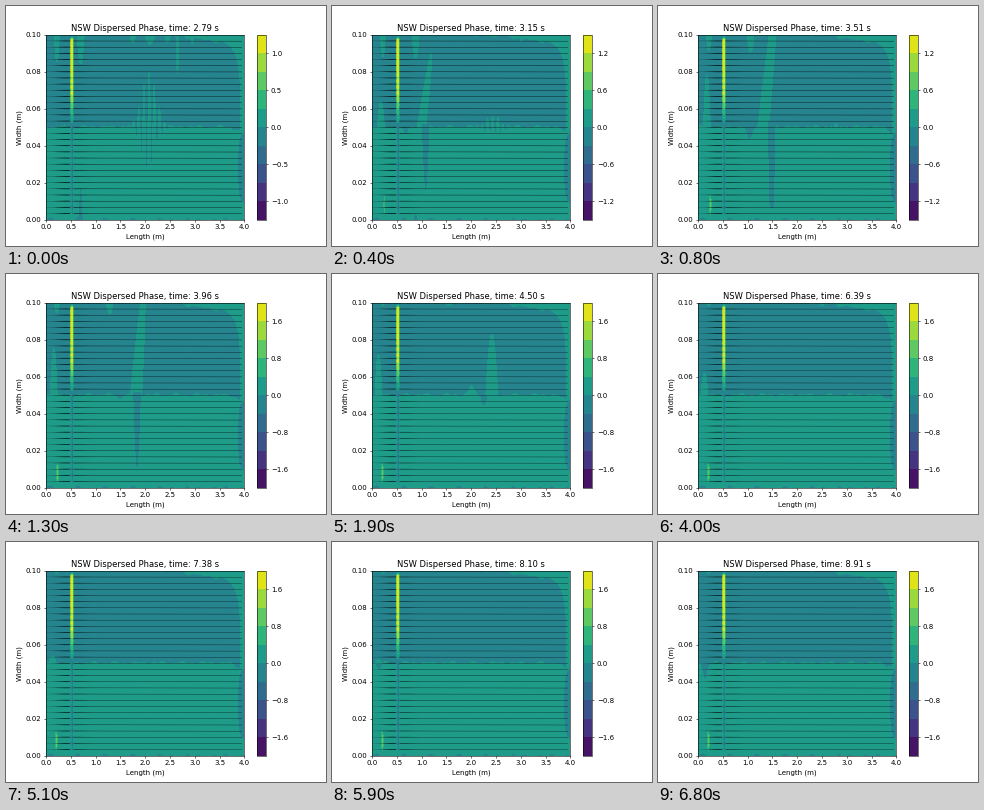
Recreate the animation shown at these times as a matplotlib script. Size 320x240 px, loop 6900 ms.

```python
import numpy as np
import matplotlib.pyplot as plt
from matplotlib.animation import FuncAnimation
from matplotlib.collections import PolyCollection

FRAMES, INTERVAL = 69, 100
T0, DT = 2.79, 0.09
LENGTH, WIDTH, MID = 4.0, 0.1, 0.05
ROWS = 30
PX = WIDTH / 184.8
JET = 0.522

X, Y = np.meshgrid(np.linspace(0, LENGTH, 501), np.linspace(0, WIDTH, 187))

fig = plt.figure(figsize=(6.4, 4.8), dpi=50)


def key(t, times, values):
    return np.interp(t, times, values)


def limit(v):
    return np.clip(v, -0.5, 0.5)


def tongue(cx, half, base, tip, lean=0.0):
    """Tapered vertical shape, positive inside, from base to tip."""
    if abs(tip - base) < 1e-4:
        return np.full_like(X, -0.5)
    s = (Y - base) / (tip - base)
    w = half * np.sqrt(np.clip(1 - s, 0, 1))
    inside = limit((w - np.abs(X - cx - lean * s)) / 0.04)
    return np.where((s < -0.05) | (s > 1), -0.5, inside)


def interface(t, front, ripple):
    """Height of the zero contour along the channel."""
    h = MID + 0.0009 * np.sin(9 * X - 4 * t) * np.sin(23 * X + t)
    c = 2.08 + 0.98 * (t - T0)
    packet = np.exp(-((X - c) / 0.21) ** 2)
    h = h + 0.03 * ripple * packet * np.cos(2 * np.pi * (X - c) / 0.105)
    trail = key(t, [2.79, 3.51, 4.5, 5.4], [0, -0.008, 0.005, 0])
    h = h + trail * np.exp(-((X - front + 0.45) / 0.07) ** 2)
    skirt = key(t, [4.5, 5.4, 6.1], [0, 0.005, 0])
    h = h + skirt * np.exp(-((X - front - 0.12) / 0.12) ** 2)
    sink = key(t, [7.4, 8.91], [0, 0.009])
    h = h - sink * np.exp(-((X - 0.14) / 0.06) ** 2)
    return h - 0.004 * np.clip((X - 3.7) / 0.3, 0, 1)


def add_wave(u, t, front):
    times = [2.79, 3.51, 4.5, 5.4, 6.1]
    crest = key(t, times, [MID, 0.13, 0.083, 0.061, MID])
    half = key(t, times, [0.06, 0.11, 0.12, 0.1, 0.05])
    lean = key(t, times, [0.1, 0.3, 0.0, 0.0, 0.0])
    lag = key(t, times, [0.1, 0.17, 0.04, 0.0, 0.0])
    u = np.maximum(u, tongue(front - lag, half, MID, crest, lean))
    trough = key(t, times, [MID, -0.02, 0.044, 0.041, MID])
    shift = key(t, times, [-0.1, 0.0, -0.2, -0.12, -0.1])
    wake = tongue(front + shift, 0.085, MID, trough)
    return np.minimum(u, -np.where(Y < 0.006, -0.5, wake))


def add_edges(u, t, ripple):
    """Short-lived spikes along the upper and lower walls."""
    for cx, half, tip in [(2.65, 0.03, 0.079), (1.75, 0.06, 0.096),
                          (2.1, 0.1, 0.095), (2.45, 0.06, 0.096),
                          (2.95, 0.04, 0.095)]:
        depth = WIDTH - (WIDTH - tip) * ripple
        u = np.maximum(u, tongue(cx + t - T0, half, WIDTH, depth))
    fade = key(t, [2.79, 3.51, 4.5], [1, 0.6, 0.1])
    u = np.maximum(u, tongue(0.22, 0.05, WIDTH, WIDTH - 0.015 * fade))
    drift = 0.7 + 0.5 * (t - T0)
    u = np.maximum(u, tongue(drift, 0.07, WIDTH, WIDTH - 0.016 * fade))
    return np.minimum(u, -tongue(drift, 0.05, 0, 0.018 * ripple))


def add_walls(u):
    reach = 0.0505 - 0.003 * np.clip((X - 2.6) / 0.6, 0, 1)
    reach = reach - 0.0012 * np.clip(np.sin(6 * X) * np.sin(17 * X), 0, 1)
    corner = (np.clip((X - 2.9) / 1.02, 0, None) ** 5
              + np.clip((Y - MID) / reach, 0, None) ** 5 - 1)
    u = np.maximum(u, limit(np.where(Y > 0.047, corner * 3, -1)))
    strip = X - 3.87 - 0.12 * ((Y - 0.028) / 0.02) ** 6
    u = np.minimum(u, -limit(strip / 0.04))
    floor = 0.0015 * np.sin(6 * X + 1) * np.sin(17 * X) - Y
    return np.minimum(u, -limit(floor / 0.001))


def add_inlet(u, t):
    """Left recirculation and the sharp jet column."""
    tip = key(t, [2.79, 3.51, 4.5, 5.4, 6.39, 7.38, 8.91],
              [0.05, 0.078, 0.072, 0.07, 0.062, 0.054, 0.05])
    cx = key(t, [3.51, 4.5], [0.18, 0.13])
    u = np.maximum(u, tongue(cx, 0.07, MID, tip))

    beat = 0.5 + 0.5 * np.cos(2 * np.pi * Y * ROWS / WIDTH)
    rise = np.clip((Y - 0.05) / 0.018, 0, 1) * np.clip((0.099 - Y) / 0.002, 0, 1)
    rise = rise * (1 - 0.25 * beat * (Y < 0.08))
    u = u + 5.2 * rise * np.exp(-((X - JET) / 0.024) ** 4)
    drop = np.clip((0.053 - Y) / 0.004, 0, 1) * np.clip(Y / 0.006, 0, 1)
    u = u - (1.2 + 1.4 * beat) * drop * np.exp(-((X - JET - 0.008) / 0.026) ** 4)

    glow = key(t, [2.79, 3.51], [0, 1.8])
    cx = key(t, [3.51, 4.5], [0.25, 0.21])
    spot = np.exp(-((X - cx) / 0.011) ** 2 - ((Y - 0.008) / 0.005) ** 4)
    return u + glow * spot


def field(t):
    front = 0.78 + 0.98 * (t - T0)
    ripple = np.exp(-(t - T0) / 0.22)
    u = limit((interface(t, front, ripple) - Y) / 0.004)
    u = add_wave(u, t, front)
    u = add_edges(u, t, ripple)
    u = add_walls(u)
    u = add_inlet(u, t)
    return np.clip(u, -4.95, 4.95)


def flow_lines(t):
    """Thin dark streaks, one per row, broken at the jet."""
    x = np.linspace(0, 3.95, 317)
    thick = (key(t, [2.79, 3.51, 4.5], [0.36, 0.36, 0.3])
             + 0.3 * np.exp(-((x - 0.4) / 0.13) ** 2)
             + 0.15 * np.exp(-((x - 0.65) / 0.2) ** 2))
    thick *= np.clip(x / 0.25, 0.4, 1)
    thick *= 1 - np.exp(-((x - JET) / 0.035) ** 4)
    half = thick * PX / 2
    lines = []
    for k in range(1, ROWS):
        y = k * WIDTH / ROWS - 0.05 * PX * x
        lines.append(np.column_stack([np.r_[x, x[::-1]],
                                      np.r_[y + half, (y - half)[::-1]]]))
    return PolyCollection(lines, facecolor="black", linewidth=0)


def draw(i):
    fig.clear()
    ax = fig.add_subplot()
    t = T0 + DT * i
    step = 0.25 if i < 4 else 0.3 if i < 12 else 0.4
    cs = ax.contourf(X, Y, field(t) * step, levels=step * np.arange(-5, 6))
    ax.add_collection(flow_lines(t))
    ax.set(xlim=(0, LENGTH), ylim=(0, WIDTH), xlabel="Length (m)",
           ylabel="Width (m)",
           title=f"NSW Dispersed Phase, time: {t:.2f} s")
    fig.colorbar(cs, ax=ax)
    return []


anim = FuncAnimation(fig, draw, frames=FRAMES, interval=INTERVAL,
                     repeat=True, repeat_delay=0)
plt.show()
```
